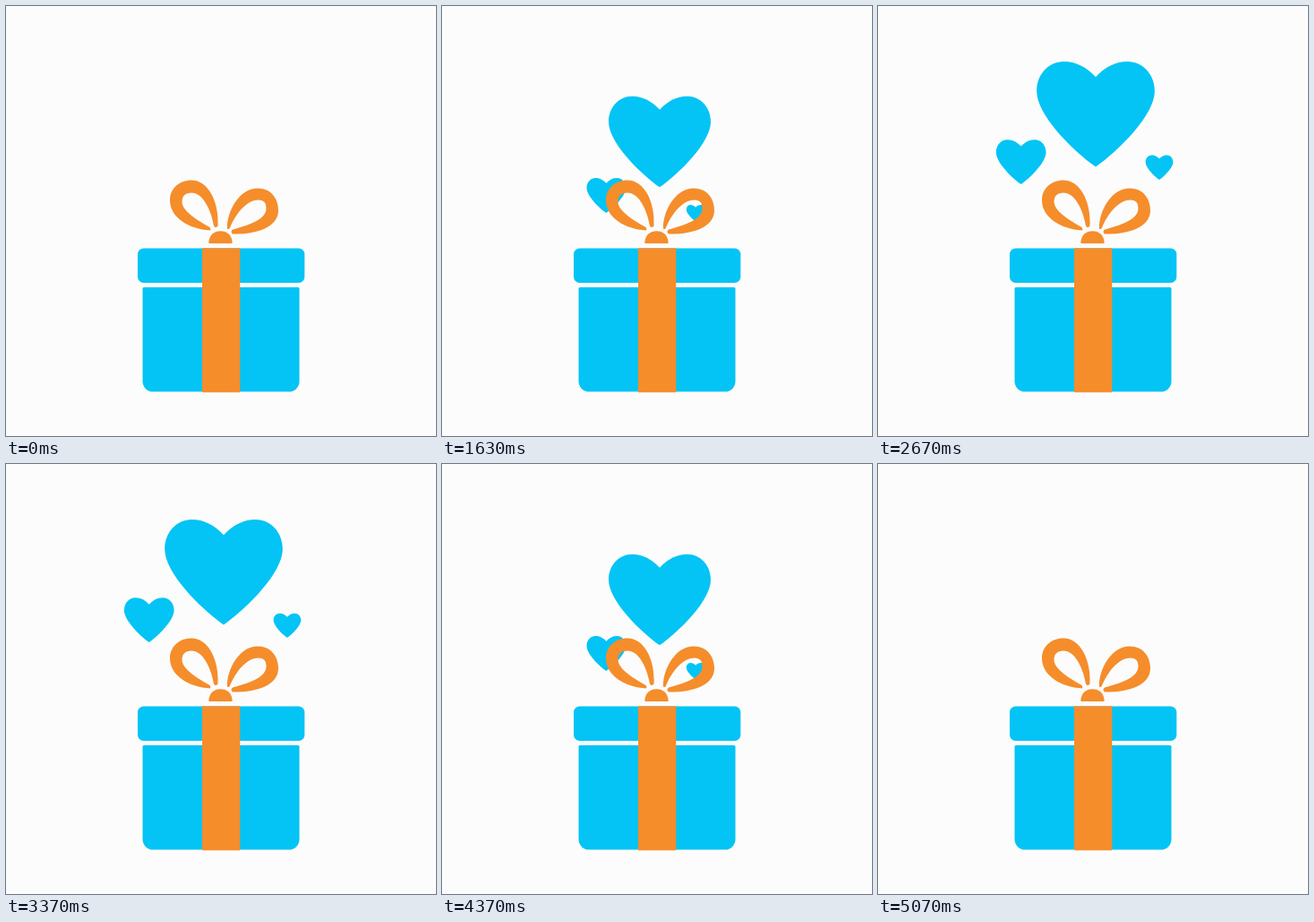
Animation, 480 px wide and 480 px high, one loop 6.01 s. Source, as an HTML page:

```html
<!DOCTYPE html>
<html lang="en">
<head>
<meta charset="utf-8">
<title>Gift with hearts</title>
<style>
  html, body { margin: 0; width: 100%; height: 100%; overflow: hidden; background: #fcfcfc; }
  svg { display: block; width: 100%; height: 100%; }
  .blue { fill: #03c4f5; }
  .orange { fill: #f58d2b; }
</style>
</head>
<body>
<svg viewBox="0 0 480 480">
  <defs>
    <path id="heart" d="M0 .131C-.08 .045-.17 0-.27 0C-.4 0-.5 .11-.5 .25C-.5 .45-.2 .75 0 .892C.2 .75 .5 .45 .5 .25C.5 .11 .4 0 .27 0C.17 0 .08 .045 0 .131Z"/>
    <clipPath id="above"><rect width="480" height="265.5"/></clipPath>
  </defs>
  <g id="hearts" class="blue" clip-path="url(#above)">
    <use href="#heart"/><use href="#heart"/><use href="#heart"/>
  </g>
  <g class="blue">
    <rect x="147" y="270.5" width="186.3" height="38.5" rx="6.5"/>
    <path d="M154 314H326A1.5 1.5 0 0 1 327.5 315.5V419A11.5 11.5 0 0 1 316 430.5H164A11.5 11.5 0 0 1 152.5 419V315.5A1.5 1.5 0 0 1 154 314Z"/>
  </g>
  <g class="orange">
    <rect x="219" y="270.3" width="42.3" height="161"/>
    <path d="M227 265Q226.2 265 226.3 263.5C227 256 232 251.3 239.5 251.3S252 256 252.6 263.5Q252.7 265 252 265Z"/>
    <path d="M228 250.500C204 249 183 236 183 217C183 204 193 194.500 207 194.500C226 194.500 238 219 236.500 245.500Q234 248.500 232 245.500C229 228 220 208.500 207 208.500C200 208.500 196.500 212 196.500 219C197 229 214 239.500 227.500 247Q229 249 228 250.500Z"/>
    <path d="M247 248.500C246 232 259 203.500 281 203.500C296 203.500 304 215 304 228C304 247 280 255 253 254.500Q250 252 253 249.500C269 245 290.500 239 290.500 226C290.500 220 288 216.500 282 216.500C268 216.500 256 233 250 247.500Q248.500 250 247 248.500Z"/>
  </g>
</svg>
<script>
const LOOP = 6010, STEP = 100 / 3, LAST = 57;

// Each heart: end pose [centre x, top y, width], distance still to go, delay in steps, rate per step
const flights = [
  { end: [243, 61.3, 132.4], away: [0, 240, -76], delay: 0, rate: .155 },
  { end: [159, 148, 56.4], away: [117, 211, -43], delay: 0, rate: .14 },
  { end: [314.7, 165.3, 31.2], away: [-127, 228, -31], delay: 3, rate: .15 }
];
const GROWTH = .84; // hearts grow a little slower than they rise
const hearts = document.querySelectorAll('#hearts use');

// Share of the way left for a critically damped spring
const left = u => (1 + u) * Math.exp(-u);

function draw(now) {
  // Rise at 30 steps a second, hold, then fall along the same path
  const n = Math.floor((now % LOOP + 5) / STEP);
  const k = Math.min(n - 28, 152 - n, LAST);
  flights.forEach(({ end, away, delay, rate }, i) => {
    const u = Math.max(k - delay, 0) * rate;
    const [x, y, w] = end.map((v, j) => v + away[j] * left(j < 2 ? u : u * GROWTH));
    hearts[i].setAttribute('transform', `translate(${x} ${y}) scale(${w})`);
  });
}

const start = performance.now();
function tick() {
  draw(performance.now() - start);
  requestAnimationFrame(tick);
}
tick();
</script>
</body>
</html>
```
